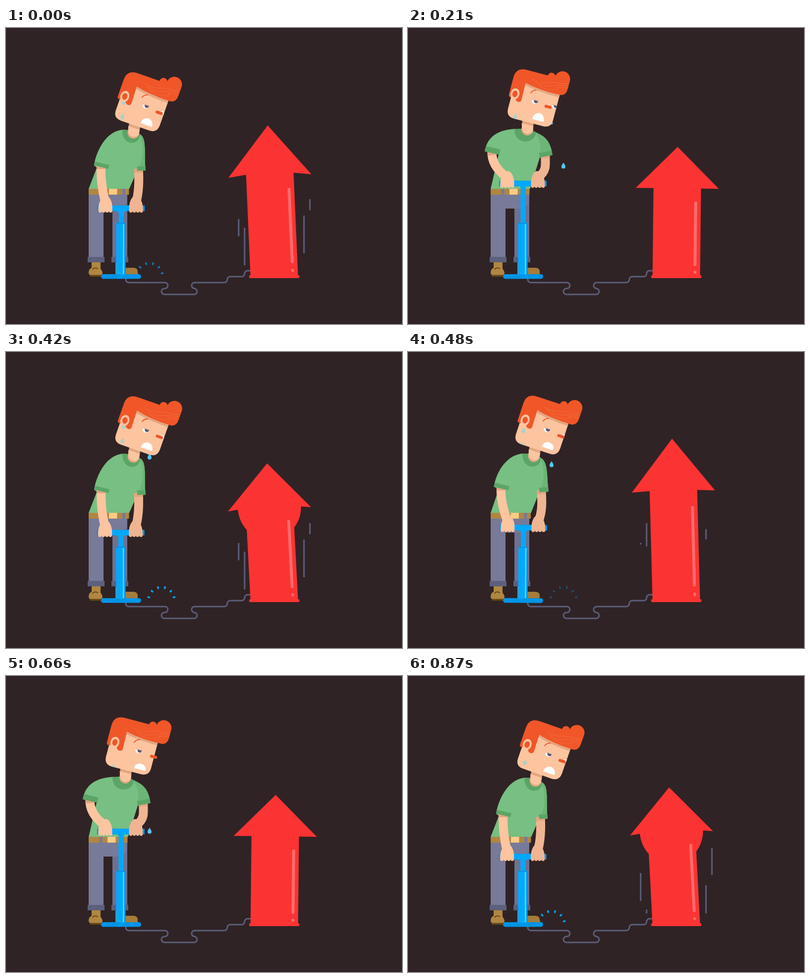
An HTML page with a canvas that plays this animation: 800x600 px, repeating every 900 ms.

```html
<!DOCTYPE html>
<html lang="en">
<head>
<meta charset="utf-8">
<title>Pumping up the arrow</title>
<style>
  html, body { margin: 0; width: 100%; height: 100%; overflow: hidden; background: #302325; }
  canvas { display: block; width: 800px; height: 600px; }
</style>
</head>
<body>
<canvas id="stage" width="800" height="600"></canvas>
<script>
const ctx = document.getElementById('stage').getContext('2d');
const LOOP = 900, CYCLE = 450, STEP = 30, TAU = 2 * Math.PI;
const C = {
  bg: '#302325', red: '#fc3333', shine: '#ff6b6b', slate: '#5b5e7a',
  skin: '#fdc4a0', shade: '#efb592', tan: '#e4a581', hair: '#f05628', strand: '#f36c3a',
  shirt: '#77bf82', sleeve: '#6cb577', band: '#5ba567',
  pants: '#777a98', pantsDark: '#6f7190', cuff: '#5d607c',
  shoe: '#b08742', shoeDark: '#a57c3a', sole: '#684614', buckle: '#fccb85',
  blue: '#00a9ff', blueDark: '#0095e6', glint: '#62d0ff', drop: '#52c8f2', sweat: '#a6d3cc'
};

const rad = d => d * Math.PI / 180;
const clamp = x => Math.max(0, Math.min(1, x));
const smooth = x => clamp(x) ** 2 * (3 - 2 * clamp(x));
const easeOut = x => 1 - (1 - clamp(x)) ** 2;
const bell = x => Math.sin(Math.PI * clamp(x)) ** 2;
const lerp = (a, b, p) => a + (b - a) * p;

// Motion of one stroke of the pump, ph = time within the stroke
const lift = ph => smooth((ph + 10) / 140) - smooth((ph - 210) / 150);
const rock = ph => .6 * Math.sin(TAU * (210 - ph) / CYCLE);
const nod = ph => 19.3 - 4.6 * lift(ph) - 11.1 * bell((ph - 210) / 210);
const pop = ph => clamp((ph + 65) % CYCLE / 220);
const stretch = ph => 1 + .26 * bell(pop(ph));
const droop = ph => 5 * Math.sin(TAU * pop(ph));
const lean = ph => 1.8 * bell((ph - 90) / 150) - 3 * bell((ph + 165) % CYCLE / 260);

function fill(color, d) {
  ctx.fillStyle = color;
  ctx.fill(new Path2D(d));
}
function stroke(color, width, d, cap = 'round') {
  ctx.strokeStyle = color;
  ctx.lineWidth = width;
  ctx.lineCap = cap;
  ctx.stroke(new Path2D(d));
}
function rect(color, x, y, w, h, r = 0) {
  ctx.beginPath();
  ctx.roundRect(x, y, w, h, r);
  ctx.fillStyle = color;
  ctx.fill();
}
function oval(color, x, y, rx, ry = rx) {
  ctx.beginPath();
  ctx.ellipse(x, y, rx, ry, 0, 0, TAU);
  ctx.fillStyle = color;
  ctx.fill();
}
function group(x, y, deg, draw) {
  ctx.save();
  ctx.translate(x, y);
  ctx.rotate(rad(deg));
  draw();
  ctx.restore();
}
function clipped(d, draw) {
  ctx.save();
  ctx.clip(new Path2D(d));
  draw();
  ctx.restore();
}
function tear(color, x, y, s = 1) {
  group(x, y, 0, () => {
    ctx.scale(s, s);
    fill(color, 'M0 -6.5C1 -3.5 4 -1.5 4 2A4 4 0 0 1 -4 2C-4 -1.5 -1 -3.5 0 -6.5Z');
  });
}

function hose() {
  const step = 'a6 6 0 0 0 6 -6a6 6 0 0 1 6 -6';
  stroke(C.slate, 3, `M242 507v3a6 6 0 0 0 6 6H321a6 6 0 0 1 0 12h-1a6 6 0 0 0 0 12H380a6 6 0 0 0 0 -12h1a6 6 0 0 1 0 -12H441${step}H476${step}H496`);
}

// x, top and start of each streak
const streaks = [[470, 388, -90], [482, 348, -32], [602, 360, -55], [614, 348, -115]];
function speedLines(t) {
  const u = t < 300 ? t : t < 780 ? t - 420 : t - LOOP;
  for (const [x, top, start] of streaks) {
    const head = easeOut((u - start) / 95), tail = easeOut((u - start - 42) / 120);
    if (head - tail > .001) stroke(C.slate, 3, `M${x} ${lerp(480, top, head)}V${lerp(480, top, tail)}`);
  }
}

function arrow(ph) {
  const k = stretch(ph), wing = droop(ph) / k - 179;
  group(542, 504, lean(ph), () => {
    ctx.scale(1, k);
    fill(C.red, `M-48 0V-179L-84 ${wing}L0 -263L84 ${wing}L48 -179V0Z`);
    // the air bubble slides up until the head swallows it
    if (ph >= 285) clipped('M-90 -182H90V60H-90Z', () => oval(C.red, 0, -73 - (ph - 330) * 1.19, 64));
    stroke(C.shine, 6, 'M37.5 -150V-25');
    oval(C.shine, 37.5, -9.5, 3);
  });
  rect(C.red, 491, 501, 102, 6, 3);
}

function splash(t, x, start) {
  const u = (t - start + LOOP) % LOOP;
  if (u > 90) return;
  const r = 15 + 11 * easeOut(u / 28);
  ctx.globalAlpha = 1 - clamp((u - 30) / 85);
  for (let i = 0; i < 6; i++)
    group(x, 503, -13 - i * 30.8, () => stroke(C.blue, 3.4, `M${r - 1} 0h2.5`));
  ctx.globalAlpha = 1;
}

function drops(t) {
  if (t >= 60 && t < 375) tear(C.drop, 314, 194 + .00262 * (t - 30) ** 2, clamp((t - 30) / 90));
  if (t >= 180 && t < 840) tear(C.drop, 290, 191 + 7.8e-7 * (t - 120) ** 3, clamp(.6 + (t - 180) / 500));
}

function legs(p) {
  rect(C.shoe, 173, 474, 18, 20);
  fill(C.shoe, 'M167 496Q167 485 180 485T195 496Q195 501 190 501H172Q167 501 167 496Z');
  rect(C.sole, 169, 500.5, 25, 3.5, 1.5);
  stroke(C.sole, 2, 'M175 489Q180 484 185 488');
  fill(C.shoeDark, 'M221 474H239V486H257Q266 486 266 494V499H221Z');
  rect(C.pantsDark, 215, 338, 30, 128);
  fill(C.pants, 'M167 337H245V345Q243 366 228 366H197V466H167Z');
  for (const x of [165, 213]) rect(C.cuff, x, 464, 34, 11);
  const shift = 3 * (1 - p);
  rect(C.shoe, 167, 325.5, 78.5 + shift, 12.2);
  for (const x of [188.5, 232]) rect(C.pants, x + shift, 325.5, 6, 12.2);
  rect(C.buckle, 205 + shift, 325.5, 16.5, 12.2);
}

// Joints of the upper body for lift p
function bodyAt(p, ph) {
  const hy = 366 - 51 * p, dx = Math.sin(rad(rock(ph))) * (504 - hy);
  const half = 8.5 + 4.5 * p, tilt = -2 - 9 * p;
  const cuffR = [lerp(273.5, 279, p), lerp(289.5, 260, p)];
  const reach = [half * Math.cos(rad(tilt)), half * Math.sin(rad(tilt))];
  return {
    p, hy, dx, half, tilt, cuffR,
    cuffL: [lerp(192.6, 169.6, p), lerp(282.5, 253.5, p)],
    neckL: [lerp(238, 218, p), lerp(206, 204.5, p)],
    neckR: [lerp(270, 257, p), lerp(215, 211, p)],
    outerR: [cuffR[0] + reach[0], cuffR[1] + reach[1]],
    innerR: [cuffR[0] - reach[0], cuffR[1] - reach[1]]
  };
}
const add = ([x, y], dx, dy) => [x + dx, y + dy];

function shirt({ p, cuffL, neckL, neckR, outerR, innerR }) {
  const outerL = add(cuffL, -14.6, -3.5);
  const [nr, ro] = [add(neckR, 16, 7), add(outerR, -4, -32)];
  fill(C.shirt, `M167 326L183.5 ${cuffL[1] + 1}L${outerL}C${add(outerL, 5, -31)} ${add(neckL, -34, 1)} ${neckL}`
    + `L${neckR}C${nr} ${ro} ${outerR}L${innerR}L${249 - 2.5 * p} 326Z`);
  fill(C.sleeve, `M${neckR}Q${284 - 12 * p} ${255 - 23 * p} ${innerR}L${outerR}C${ro} ${nr} ${neckR}Z`);
  fill(C.band, `M${add(neckL, -3, 1)}C${add(neckL, -3, 34)} ${add(neckR, 1, 25)} ${add(neckR, 1, 0)}Q${add(neckR, -16, -11)} ${add(neckL, -3, 1)}Z`);
}

function pump(y) {
  rect(C.blueDark, -40, -5, 81, 9.5, 4.7);
  rect(C.blue, -4.5, y, 10, -108 - y);
  rect(C.blue, -9.5, -109, 19, 105, 2);
  rect(C.blueDark, -9.5, -109, 19, 2);
  rect(C.blueDark, 7.5, -108, 2, 104);
  rect(C.glint, 4, -107, 2.6, 102);
  rect(C.blueDark, -48, y - 5.5, 96, 11.5, 1);
  fill(C.blue, `M-13 ${y - 5}H14V${y + 5}Q6 ${y + 5} 5.5 ${y + 10}H-4.5Q-5 ${y + 5} -13 ${y + 5}Z`);
  for (const s of [-1, 1])
    fill(C.blue, `M${s * 21} ${y - 5.5}H${s * 13}L${s * 12} ${y + 5}H${s * 18}Z`);
}

const finger = 'a3.5 4 0 0 1 -7 0';
function arm(color, side, start, x, { p, hy, dx }) {
  const wrist = [x + dx, hy - 12];
  const d = `M${start}C${add(start, side * 1.5, 24)} ${add(wrist, side * (6 + 11 * p), -22 + 10 * p)} ${wrist}`;
  stroke(color, 18, d, 'butt');
  ctx.setLineDash([8, 999]);
  stroke(C.tan, 18, d, 'butt');
  ctx.setLineDash([]);
  group(x + dx, hy, 0, () => {
    ctx.scale(-side, 1);
    fill(color, 'M-14 6C-15 -10 -9 -24 2 -25C10 -24 14 -10 14 -2V5' + finger.repeat(4) + 'Z');
  });
}

function arms(body) {
  const { p, cuffL, cuffR, half, tilt } = body;
  arm(C.shade, 1, add(cuffR, -6 + 4 * p, -4), 262.5, body);
  arm(C.skin, -1, add(cuffL, 0, -4), 200.5, body);
  group(...cuffL, 13.5, () => rect(C.band, -15, -8 - 3 * p, 30, 8 + 3 * p));
  group(...cuffR, tilt, () => rect(C.band, -half, -9, 2 * half, 9));
}

function eye(x, y) {
  clipped(`M${x - 7} ${y}H${x + 7}A7 7.5 0 0 1 ${x - 7} ${y}Z`, () => {
    rect('#fff', x - 8, y, 16, 10);
    oval('#555a76', x + 2.2, y + 1.2, 4.4);
  });
  stroke(C.tan, 1.2, `M${x - 6.5} ${y}H${x + 6.5}`);
}

const face = 'M-47 -85H47V-17Q47 0 30 0H-30Q-47 0 -47 -17Z';
const sweatStarts = [0, 235, 420, 716];

function hair(s, up) {
  fill(C.hair, `M-52.5 -45V-80Q-52.5 -102 -30 -102H${s + 16}L${s + 44} ${-104 - up}L${s + 59.6} ${-102 - up}V-86Q${s + 59.6} -70 ${s + 46} -70Q${s + 5} -68.5 ${s - 26} -76L${s - 25} -41Q${s - 25} -35 ${s - 31} -35T${s - 38} -42H-44Q-47 -39 -50 -40.5T-52.5 -45Z`);
  oval(C.hair, 21.7 + s, -101.5 - up / 2, 8);
  oval(C.hair, 44.1 + s, -102.5 - up, 15.5);
  for (let i = 0; i < 3; i++) {
    const x = s + i * 9, y = i * 5 - 89;
    stroke(C.strand, 1, `M${x - 16} ${y + 2}Q${x} ${y + 7} ${x + 14} ${y + 2}T${s + 40} ${y - 4}T${s + 57} ${y - 8}`);
  }
}

function head(t, ph, p) {
  const turn = .5 - .5 * Math.cos((t - 210) / LOOP * TAU), tip = nod(ph);
  const s = 7 * turn, look = 11.8 * turn;
  group(238.8 + 15.9 * (1 - p) + .096 * tip, 206.6 + 5.6 * (1 - p) + .17 * tip, tip, () => {
    ctx.translate(-1.5, -18);
    fill(C.tan, 'M-13.5 -4H10L13.2 15A11.7 11.7 0 0 1 -10.2 15Z');
    fill(C.skin, 'M-12.8 5H11.5L13 13.5A11.7 11.7 0 0 1 -10 13.5Z');
    fill(C.skin, face);
    clipped(face, () => {
      fill(C.tan, `M${s - 27} -80L${s - 26} -71Q${s + 5} -64 60 -65V-80Z`);
      eye(43 + look, -47.5);
      for (const start of sweatStarts) {
        const y = -37.4 + (t - start + LOOP) % LOOP * .155;
        if (y < 8) tear(C.sweat, -37 + (y + 37) * .25, y, .95);
      }
    });
    hair(s, 2.5 * (1 - p));
    const ear = -41 + 4 * turn;
    oval(C.skin, ear, -49, 9, 11.5);
    oval(C.hair, ear, -49, 5.2, 6.8);
    stroke(C.hair, 1.8, `M${look - 11} -58.5Q${look - 8.5} -66 ${look - 1.5} -67`);
    eye(1.6 + look, -47);
    rect(C.hair, 22.9 + 15.5 * turn, -43.6, 15, 6, 3);
    const mx = 17.3 + 8 * turn, top = -29 + 4.5 * turn;
    fill('#fff', `M${mx - 12} -8.5C${mx - 12} ${top} ${mx + 12} ${top} ${mx + 12} -8.5Z`);
  });
}

function draw(t) {
  const ph = t % CYCLE, p = lift(ph), body = bodyAt(p, ph);
  rect(C.bg, 0, 0, 800, 600);
  hose();
  speedLines(t);
  arrow(ph);
  splash(t, 314, 390);
  splash(t, 290, 840);
  legs(p);
  shirt(body);
  drops(t);
  head(t, ph, p);
  group(232, 504, rock(ph), () => pump(body.hy - 504));
  arms(body);
}

const began = performance.now();
function frame() {
  const t = Math.max(0, performance.now() - began) % LOOP;
  draw(Math.floor(t / STEP) * STEP);
  requestAnimationFrame(frame);
}
frame();
</script>
</body>
</html>
```
